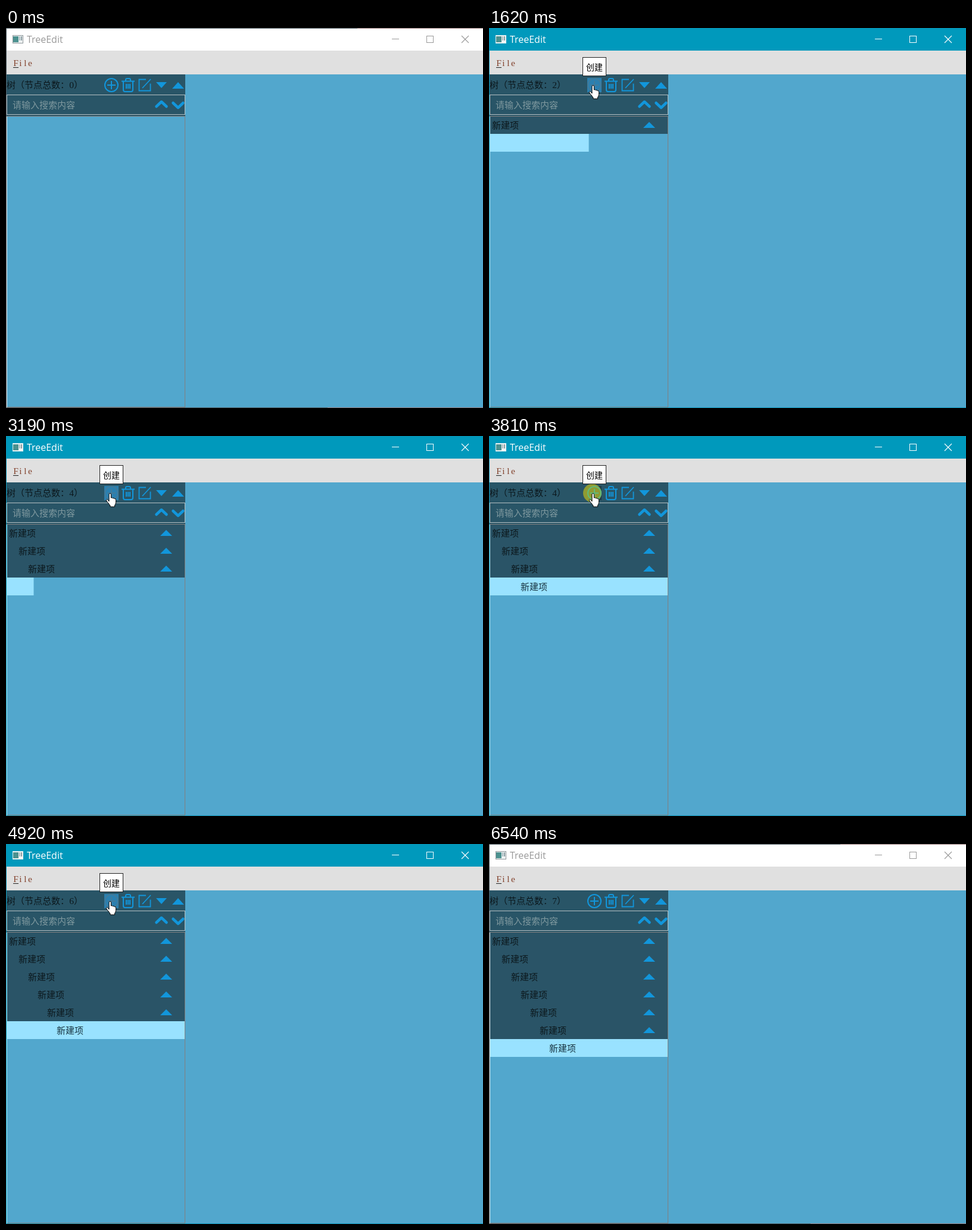
These frames come from a looping animation (801x639 px, 6620 ms). An HTML page with a canvas:

```html
<!DOCTYPE html>
<html lang="zh">
<head>
<meta charset="utf-8">
<style>
html, body { margin: 0; width: 100%; height: 100%; overflow: hidden; background: #52a7cd; }
canvas { display: block; }
</style>
</head>
<body>
<canvas id="stage" width="801" height="639"></canvas>
<script>
const g = document.getElementById('stage').getContext('2d');
const LOOP = 6620, SLIDE = 300;
const BLUE = '#1296db', DARK = '#295567', INK = '#0c181d';
const CJK = '15px "Noto Sans CJK SC", "Noto Sans CJK", sans-serif';
const LATIN = '15.5px "Liberation Serif", serif';

// Each click: press, release, start of the new row's slide
const clicks = [
  [620, 780, 696], [1480, 1560, 1550], [2320, 2470, 2400], [3020, 3190, 3175],
  [3810, 3970, 3965], [4510, 4680, 4610], [5150, 5290, 5290]
];

const clamp = v => Math.max(0, Math.min(1, v));
const easeOut = p => 1 - (1 - clamp(p)) ** 3;

function rect(x, y, w, h, color) {
  g.fillStyle = color;
  g.fillRect(x, y, w, h);
}

function frame(x, y, w, h, color) {
  g.strokeStyle = color;
  g.lineWidth = 1;
  g.strokeRect(x + .5, y + .5, w - 1, h - 1);
}

function text(s, x, y, color, font = CJK, align = 'left') {
  g.font = font;
  g.fillStyle = color;
  g.textAlign = align;
  g.fillText(s, x, y);
}

function stroke(d, color, width) {
  g.strokeStyle = color;
  g.lineWidth = width;
  g.stroke(new Path2D(d));
}

function fill(d, color) {
  g.fillStyle = color;
  g.fill(new Path2D(d));
}

function disc(x, y, r, color) {
  g.fillStyle = color;
  g.beginPath();
  g.arc(x, y, r, 0, 7);
  g.fill();
}

function at(x, y, draw) {
  g.save();
  g.translate(x, y);
  draw();
  g.restore();
}

function titleBar(active) {
  const ink = active ? '#fff' : '#999';
  rect(0, 0, 801, 38, active ? '#0099bc' : '#fff');
  rect(11, 12, 18, 14, active ? '#e4eef0' : '#8c9599');
  rect(12, 13, 16, 12, '#f3f6f6');
  rect(12, 14, 9, 10, '#4b918f');
  rect(22, 14, 2, 7, '#a9bcc0');
  rect(25, 14, 2, 7, '#8b9da2');
  text('TreeEdit', 35, 25, ink, '16px "Open Sans", "Noto Sans", sans-serif');
  stroke('M648 18.5h12', ink, 1);
  frame(706, 13, 12, 12, ink);
  stroke('M765 13l12 12M777 13l-12 12', ink, 1.1);
}

function menuBar() {
  rect(0, 38, 801, 40, '#e0e0e0');
  [...'File'].forEach((c, i) => text(c, 16.5 + i * 8, 64, '#84442f', LATIN, 'center'));
  rect(12, 66, 9, 1, '#222');
}

function toolbar(count, hover, pressed) {
  rect(1, 78, 300, 70, DARK);
  text('树（节点总数：', 1, 101, INK);
  text(count, 110, 101, INK, LATIN, 'center');
  text('）', 114, 101, INK);

  if (pressed) {
    rect(165, 84, 24, 24, '#1d3c49');
    disc(173.5, 96, 15.5, '#8f9b33');
  } else if (hover) {
    rect(165, 84, 24, 24, '#2b80b0');
  }
  const plus = pressed ? '#62ba79' : hover ? '#427b9b' : BLUE;
  stroke('M188 96a11 11 0 1 1-22 0a11 11 0 1 1 22 0M170 96h14M177 89v14', plus, 2);
  stroke('M194 89.5h22M201 89v-2q0-2 2-2h4q2 0 2 2v2M197 90v14q0 3 3 3h10q3 0 3-3v-14M202 94v8M205 94v8M208 94v8', BLUE, 2);
  stroke('M235 86.5h-11.5v19h19v-12M229 101l14-15', BLUE, 1.8);
  fill('M252 91h18l-9 10z', BLUE);
  fill('M279 102h20l-10-11z', BLUE);
}

function searchBox(hover) {
  frame(1, 112, 300, 34, hover ? '#109bd0' : '#b5c0c3');
  text('请输入搜索内容', 11, 135, '#7f999f');
  g.lineCap = g.lineJoin = 'round';
  stroke('M252.5 132l8.5-8l8.5 8M280.5 126l8.5 8l8.5-8', BLUE, 4.5);
  g.lineCap = 'butt';
  g.lineJoin = 'miter';
}

function tree(t, count, active) {
  g.save();
  g.beginPath();
  g.rect(2, 148, 298, 490);
  g.clip();
  for (let i = 0; i < count; i++) {
    const last = i === count - 1;
    const x = (easeOut((t - clicks[i][2]) / SLIDE) - 1) * 300;
    const y = 148 + 30 * i;
    at(x, y, () => {
      rect(0, 0, 301, 30, last ? '#99e2ff' : '#2a5467');
      text('新建项', 5 + 16 * i, 21, last ? '#17333f' : INK);
      if (!last) fill('M259 20h20l-10-10z', BLUE);
    });
  }
  g.restore();
  frame(1, 148, 300, 490, '#808080');
  rect(1, 149, 1, 489, active ? '#a5e4f3' : '#e3eef0');
}

function tooltip() {
  rect(157, 49, 40, 32, '#fff');
  frame(157, 49, 40, 32, '#222');
  text('创建', 163, 71, '#000', '14px "Noto Sans CJK SC", "Noto Sans CJK", sans-serif');
}

function shape(d) {
  g.lineJoin = 'round';
  fill(d, '#fff');
  stroke(d, '#000', 1);
  g.lineJoin = 'miter';
}

const arrow = () => shape('M.5 .5v16l3.7-3.5l2.7 6l2.5-1l-2.6-6h5z');

const hand = () => shape('M5.5 14V2.5q0-2 1.7-2t1.7 2V8q2-1.2 3 .7q2-.9 2.8 .8q2.3-.6 2.3 2v4q0 3-2 5v2.5H7.5v-2L1.2 13q-.8-2 .7-2.5q1.2-.3 3.6 3.5z');

const beam = () => stroke('M-3 -7.5h2.5l.5 1l.5-1h2.5M0 -7v14M-3 7.5h2.5l.5-1l.5 1h2.5', '#b9c8cc', 1);

function cursorAt(t) {
  if (t < 70 || t >= 6310) return null;
  if (t < 470) {
    const p = 1 - (1 - (t - 70) / 400) ** 2;
    return { x: 530 - 356 * p, y: 458 - 362 * p, draw: arrow };
  }
  if (t < 5920) return { x: 167.5, y: 96, draw: hand };
  const p = clamp((t - 5920) / 330) ** 1.4;
  const x = 177.5 + 533 * p, y = 118 + 508 * p;
  return { x, y, draw: y < 146 ? beam : arrow };
}

function render(t) {
  const active = t >= 620 && t < 6540;
  const count = clicks.filter(c => t >= c[1]).length;
  const pressed = clicks.some(c => t >= c[0] && t < c[1]);
  const onPlus = t >= 470 && t < 5920;
  const cursor = cursorAt(t);
  const onSearch = !onPlus && cursor && cursor.x < 301 && cursor.y > 112 && cursor.y < 146;

  rect(0, 0, 801, 639, '#52a7cd');
  titleBar(active);
  menuBar();
  toolbar(count, onPlus, pressed);
  searchBox(onSearch);
  tree(t, count, active);

  const edge = active ? '#0a93b5' : '#4d5b63';
  rect(0, 0, 801, 1, edge);
  rect(0, 0, 1, 639, edge);
  rect(0, 638, 801, 1, edge);
  if (!active) {
    rect(590, 0, 211, 1, '#987b7b');
    rect(540, 638, 261, 1, '#927577');
  }
  if (t >= 620 && t < 5920) tooltip();
  if (cursor) at(cursor.x, cursor.y, cursor.draw);
}

const start = performance.now();
function tick() {
  render((performance.now() - start) % LOOP);
  requestAnimationFrame(tick);
}
tick();
</script>
</body>
</html>
```
